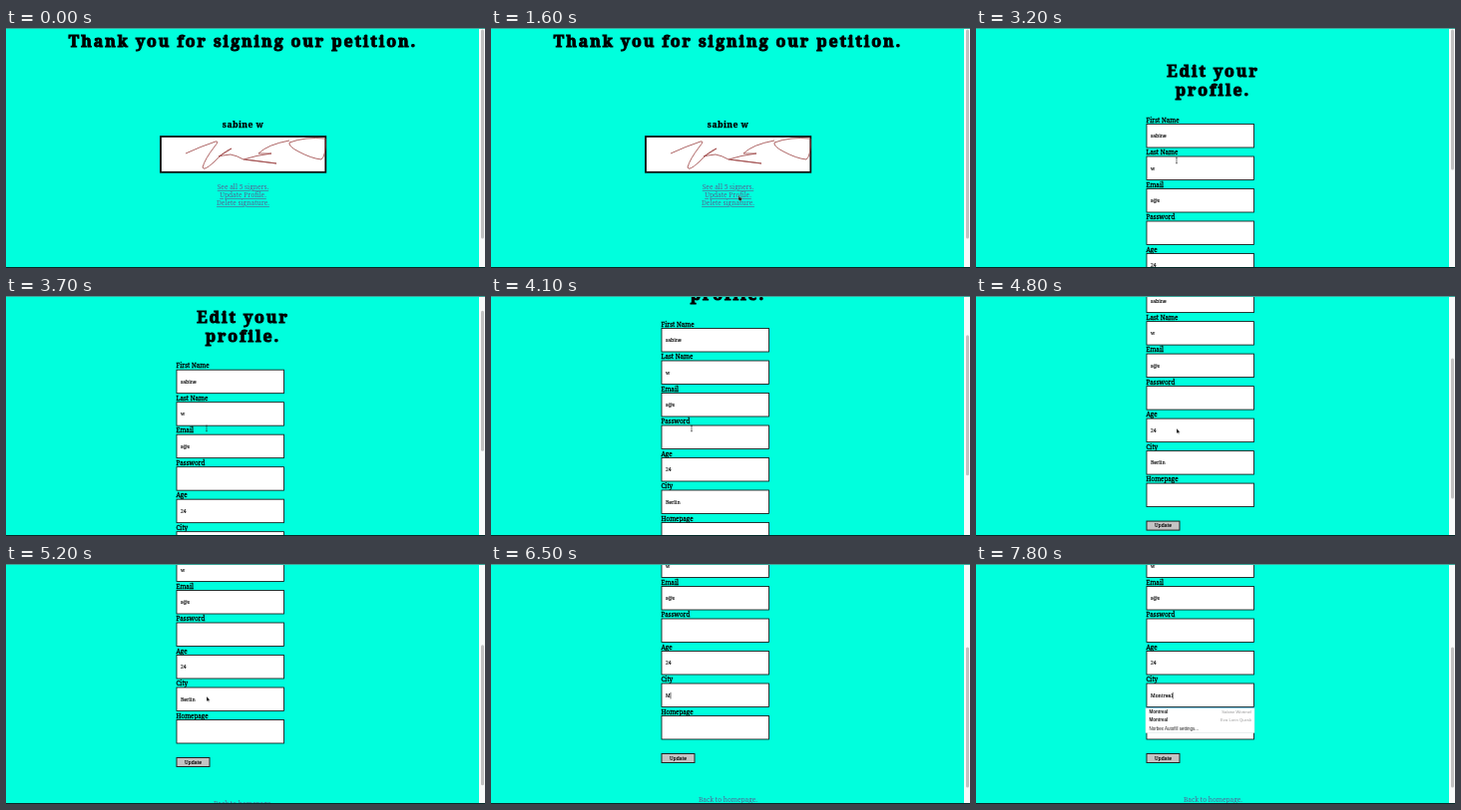
These frames come from a looping animation (480x241 px, 8000 ms). An HTML page:

```html
<!DOCTYPE html>
<html lang="en">
<head>
<meta charset="utf-8">
<title>Petition</title>
<style>
  html, body { margin: 0; width: 100%; height: 100%; overflow: hidden; background: #00ffdd; }
  svg { display: block; width: 100vw; height: 100vh; }
  text { font-family: "Noto Serif", serif; fill: #000; }
  .title { font-size: 16px; font-weight: 700; letter-spacing: 1.9px; stroke: #000; stroke-width: 1; text-anchor: middle; }
  .name { font-size: 8.6px; font-weight: 700; letter-spacing: .4px; stroke: #000; stroke-width: .25; text-anchor: middle; }
  .label { font-size: 6.3px; stroke: #000; stroke-width: .28; }
  .value { font-size: 5px; stroke: #000; stroke-width: .12; }
  .link { font-size: 6.6px; fill: #545f92; text-decoration: underline; text-decoration-thickness: .5px; text-anchor: middle; }
  .button { font-size: 5px; stroke: #000; stroke-width: .12; text-anchor: middle; }
  .menu text { font: 4.5px "Liberation Sans", Arial, sans-serif; fill: #222; }
  .menu .strong { font-weight: 700; }
  .menu .owner { font-size: 4.2px; fill: #999; text-anchor: end; }
  .field { fill: #fff; stroke: #111; stroke-width: .85; }
</style>
</head>
<body>
<svg viewBox="0 0 480 241" preserveAspectRatio="none">
  <rect width="480" height="241" fill="#00ffdd"/>

  <g id="thanks">
    <text class="title" x="237.5" y="19">Thank you for signing our petition.</text>
    <text class="name" x="237.5" y="99.7">sabine w</text>
    <rect x="155" y="109" width="165.3" height="35.8" fill="#fff" stroke="#111" stroke-width="1.8"/>
    <path fill="none" stroke="#a04a4a" stroke-width=".85" stroke-linejoin="round" d="M180 126 Q195 119 210 114
      Q214 113 209 119 Q199 132 197 140 Q198 144 208 135 Q218 124 226 121 Q222 124 213 129
      Q216 128 225 127 Q231 128 238 132
      M284 113 Q262 117 253 126 L266 126 Q250 128 238 132 L271 136 L240 132
      M320 111 Q300 109 284 115 Q283 119 293 124 Q306 131 316 132 Q321 128 320 111"/>
    <text class="link" x="237.5" y="162">See all 5 signers.</text>
    <text class="link" x="237.5" y="170">Update Profile.</text>
    <text class="link" x="237.5" y="178">Delete signature.</text>
  </g>

  <g id="profile">
    <text class="title" x="237.5" y="49">Edit your</text>
    <text class="title" x="237.5" y="68">profile.</text>
    <g id="form"></g>
    <rect x="171" y="329.5" width="33" height="9" fill="#c4c4c4" stroke="#222"/>
    <text class="button" x="187.5" y="335.8">Update</text>
    <text class="link" x="237.5" y="378.3">Back to homepage.</text>
    <rect id="selection" x="174.5" y="267.5" width="15" height="7" fill="#a8d1ff" opacity=".6"/>
    <path id="caret" stroke="#111" stroke-width=".6"/>
    <g id="menu" class="menu">
      <rect x="170" y="283.5" width="109" height="25" fill="#fff" stroke="#d5dfe2" stroke-width=".5"/>
      <path d="M170 283.3H279" stroke="#5b9dd9" stroke-width=".7"/>
      <text class="strong" x="173.5" y="289.3">Montreal</text>
      <text class="owner" x="276" y="289.2">Sabine Wortmel</text>
      <text class="strong" x="173.5" y="297.4">Montreal</text>
      <text class="owner" x="276" y="297.3">Eva Lorin Quesk</text>
      <text x="173.5" y="305.8">Norbex Autofill settings...</text>
    </g>
  </g>

  <rect x="474" width="6" height="241" fill="#f8fafa"/>
  <rect id="thumb" x="476" width="3" rx="1.5" fill="#c1c1c1"/>
  <rect width="480" height="1" fill="#3fa99c"/>
  <rect y="240" width="480" height="1" fill="#062b29"/>

  <g id="pointer">
    <path id="arrow" d="M0 0V5L1.2 4L2 5.6L2.7 5.2L2 3.8H3.5Z" fill="#111" stroke="#fff" stroke-width=".25"/>
    <path id="hand" d="M.5 0Q1.1 0 1.1 .6V2L3.4 2.6V4L2.8 5.4H.9L-.8 3.2L0 3V.5Z" fill="#222" stroke="#fff" stroke-width=".25"/>
    <path id="beam" d="M-1 -3L0 -2.5L1 -3M0 -2.5V2.5M-1 3L0 2.5L1 3" fill="none" stroke="#222" stroke-width=".6"/>
  </g>
</svg>
<script>
const LOOP = 8000, STEP = 100, OPEN_PROFILE = 2200;
const FIELDS = [["First Name", "sabine"], ["Last Name", "w"], ["Email", "s@s"],
  ["Password", ""], ["Age", "24"], ["City", "Berlin"], ["Homepage", ""]];

const scrollKeys = [[3400, 0], [3500, 3], [3800, 32], [4100, 64], [4500, 91], [4600, 91],
  [4800, 103.4], [5200, 135], [5400, 139]];
const xKeys = [[100, 475], [900, 385], [1500, 248], [2200, 248], [2900, 201]];
const yKeys = [[100, 182], [900, 172], [1500, 168], [2200, 168], [2900, 133]];
const typingTimes = [6500, 6600, 6700, 6900, 7200, 7500, 7600, 7800];

const $ = id => document.getElementById(id);
const show = (id, on) => $(id).setAttribute("display", on ? "inline" : "none");

function at(keys, t) {
  if (t <= keys[0][0]) return keys[0][1];
  for (let i = 1; i < keys.length; i++) {
    const [t0, v0] = keys[i - 1], [t1, v1] = keys[i];
    if (t <= t1) return v0 + (v1 - v0) * (t - t0) / (t1 - t0);
  }
  return keys[keys.length - 1][1];
}

$("form").innerHTML = FIELDS.map(([label, value], i) => {
  const y = 96.5 + i * 32.5;
  return `<text class="label" x="170.5" y="${y - 2}">${label}</text>
    <rect class="field" x="171" y="${y}" width="107.5" height="23.5"/>
    <text class="value" x="175" y="${y + 13.6}" id="value${i}">${value}</text>`;
}).join("");

function render(time) {
  const t = Math.floor(time / STEP) * STEP;
  const onProfile = t >= OPEN_PROFILE;
  const scroll = at(scrollKeys, t);
  show("thanks", !onProfile);
  show("profile", onProfile);
  $("profile").setAttribute("transform", `translate(0 ${-scroll})`);
  $("thumb").setAttribute("y", 1.5 + scroll * .59);
  $("thumb").setAttribute("height", onProfile ? 141 : 210);

  const typed = typingTimes.filter(start => t >= start).length;
  const city = $("value5");
  city.textContent = typed ? "Montreal".slice(0, typed) : "Berlin";
  show("selection", t >= 5800 && !typed);
  show("menu", t >= 6900);
  show("caret", typed > 0);
  if (typed) {
    const x = 175.3 + city.getComputedTextLength();
    $("caret").setAttribute("d", `M${x} 267.8V274.5`);
  }

  const overLink = t >= 1500 && !onProfile;
  const overText = onProfile && (t < 4500 || t >= 5600);
  show("pointer", t >= 100 && !typed);
  show("hand", overLink);
  show("beam", overText);
  show("arrow", !overLink && !overText);
  $("pointer").setAttribute("transform", `translate(${at(xKeys, t)} ${at(yKeys, t)})`);
}

const start = performance.now();
function tick() {
  render((performance.now() - start) % LOOP);
  requestAnimationFrame(tick);
}
tick();
</script>
</body>
</html>
```
